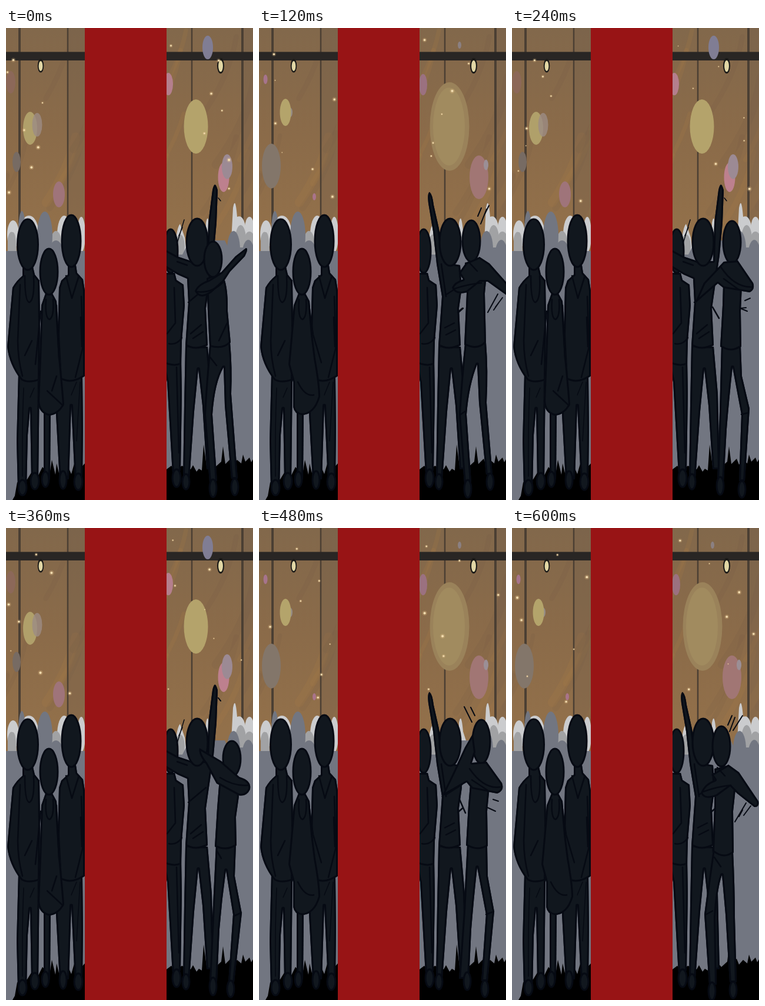
These frames come from a looping animation (420x800 px, 0.72 s). An HTML page with a canvas:

```html
<!DOCTYPE html>
<html lang="en">
<head>
<meta charset="utf-8">
<title>Party crowd</title>
<style>
html, body { margin: 0; width: 100%; height: 100%; overflow: hidden; background: #727681; }
canvas { display: block; }
</style>
</head>
<body>
<canvas id="stage" width="420" height="800"></canvas>
<script>
const ctx = document.getElementById('stage').getContext('2d');
const BODY = '#11171e', INK = '#060a13', GREY = '#727681';

function fill(color, d) {
  ctx.fillStyle = color;
  ctx.fill(new Path2D(d));
}
function line(color, width, d) {
  ctx.strokeStyle = color;
  ctx.lineWidth = width;
  ctx.stroke(new Path2D(d));
}
// body part whose outline lies inside its edge
function part(d) {
  fill(BODY, d);
  ctx.save();
  ctx.clip(new Path2D(d));
  line(INK, 6, d);
  ctx.restore();
}
function oval(color, x, y, rx, ry) {
  ctx.fillStyle = color;
  ctx.beginPath();
  ctx.ellipse(x, y, rx, ry, 0, 0, 7);
  ctx.fill();
}
function blob(x, y, rx, ry) {
  oval(BODY, x, y, rx - 2, ry - 2);
  ctx.strokeStyle = INK;
  ctx.lineWidth = 3;
  ctx.stroke();
}
function random(seed) {
  return () => {
    seed = (seed * 16807) % 2147483647;
    return seed / 2147483647;
  };
}

function wall() {
  const shade = ctx.createLinearGradient(0, 0, 0, 340);
  shade.addColorStop(0, '#82684b');
  shade.addColorStop(.55, '#8b6b49');
  shade.addColorStop(1, '#92704a');
  ctx.fillStyle = shade;
  ctx.fillRect(0, 0, 420, 400);
  const rnd = random(91);
  for (let i = 0; i < 26; i++) {
    const x = rnd() * 480, y = rnd() * 260, len = 60 + rnd() * 90;
    const color = i % 2 ? 'rgba(170,124,66,.17)' : 'rgba(104,84,64,.12)';
    line(color, 6 + rnd() * 10, `M${x} ${y} q-12 ${len / 2} -${len * .45} ${len}`);
  }
  ctx.fillStyle = 'rgba(108,92,76,.28)';
  ctx.fillRect(106, 0, 28, 330);
  ctx.fillRect(403, 0, 17, 330);
  line('#4b3f33', 4, 'M23 0V330M402 0V330');
  line('#4b3f33', 2.5, 'M105 0V330M316 0V330');
  ctx.fillStyle = '#292624';
  ctx.fillRect(0, 40.5, 420, 14.5);
  for (const [x, r] of [[59, 1], [365, 1.15]]) {
    oval('#1b1a18', x, 64, 5.3 * r, 11.5 * r);
    oval('#e2d7a5', x, 64.5, 3.4 * r, 8.5 * r);
  }
}

const LIGHTS = [
  [['#b4a36b', 323, 167, 20.5, 46], ['#b0a06a', 41, 170, 12, 28], ['#9c8c84cc', 53, 164, 8.5, 20],
   ['#8c6859', 8, 92, 8, 19], ['#776b63', 18, 227, 7, 17], ['#9f747a', 90, 282, 10, 22],
   ['#b47f8d', 276, 95, 8, 19], ['#807d94', 343, 33, 9, 20], ['#bd808e', 370, 253, 9.5, 25],
   ['#9c8a94', 376, 235, 9, 21]],
  [['#9a825a', 324, 167, 33.5, 75], ['#a18b5f', 323, 167, 27, 66], ['#a6748c', 11, 87, 3.5, 8],
   ['#948b87', 53, 143, 4, 8], ['#b4a46b', 45, 143, 9.5, 23], ['#83766a', 21, 234, 16, 38],
   ['#a9748a', 94, 286, 3, 6], ['#9b7180', 279, 96, 7, 18], ['#8b8082', 341, 29, 3, 6],
   ['#a17674', 374, 253, 16, 37], ['#9b8f96', 386, 232, 4, 9]]
];

function sparkles(frame) {
  const rnd = random(4073 + frame * 977);
  for (let i = 0; i < 14; i++) {
    const x = i % 2 ? 2 + rnd() * 128 : 276 + rnd() * 140;
    const y = 15 + (i + rnd()) * 20, r = .6 + rnd() * 1.5;
    oval('rgba(240,200,140,.25)', x, y, r * 2, r * 2);
    oval('#f3ddb0', x, y, r, r);
  }
}

function crowd() {
  const pale = '#cbccce', mid = '#a1a2a4';
  oval(pale, 12, 350, 10, 24);
  oval(pale, 39, 345, 16, 27);
  oval(pale, 99, 350, 12, 32);
  oval(pale, 128, 350, 7, 30);
  fill(mid, 'M3 378V356Q6 343 11 346Q17 344 18 378Z');
  oval(mid, 85, 364, 9, 20);
  oval(GREY, 27, 345, 6, 35);
  oval(GREY, 66, 352, 13, 41);
  oval(GREY, 85, 385, 13, 25);
  fill(pale, 'M286 400Q288 340 296 332L304 355L310 400ZM340 400V330Q344 310 347 345L352 360V400Z');
  fill(pale, 'M382 380L386 305Q390 283 393 320Q404 315 408 340L412 380Z');
  oval(pale, 414, 340, 8, 20);
  oval(mid, 296, 370, 8, 20);
  oval(mid, 399, 358, 9, 24);
  oval(mid, 414, 360, 9, 15);
  oval(GREY, 387, 375, 11, 31);
  oval(GREY, 412, 388, 11, 29);
  fill(GREY, 'M0 378H20L24 350H52L58 378H134V800H0ZM273 384H300L312 360H372L378 372H420V800H273Z');
  fill('#000', 'M11 800L15 793L19 770L36 765L44 752L53 762L62 744L74 757L78 732L84 757L86 738L90 754L105 742L111 756L117 735L123 750L134 738V800Z');
  fill('#000', 'M273 748L281 742L288 750L299 742L314 748L318 741L324 752L328 747L333 750L336 706L341 742L349 736L356 744L366 735L369 709L373 739L382 730L386 740L393 732L400 738L403 723L407 735L414 728L417 736L420 731V800H273Z');
}

function trio(alt) {
  // tall left figure
  part('M21 585L57 590L56 680L55 768H43L41 645L37 690L35 780H20L18 700Z');
  blob(28, 779, 9, 15);
  blob(49, 768, 9, 16);
  part('M28 405L46 405L49 418L57 428L58 500L57 597Q38 604 26 597Q5 570 2 540L11 440Q18 428 28 420Z');
  line(INK, 2.5, 'M24 435L20 530Q20 560 28 590M32 420Q32 465 40 465Q49 460 47 420M44 530L32 555');
  line(INK, 1.5, 'M48 610L41 626M30 610Q27 680 28 760');
  blob(37, 367, 19.5, 45);
  // right figure of the trio
  part('M87 590H130L131 680L130 765H117L111 640L107 765H91L85 655Z');
  blob(97, 766, 8, 17);
  blob(123, 769, 9, 16);
  part('M105 402L119 402L121 415L131 426L134 445V590Q112 606 92 595L88 520L90 440L94 428L105 418Z');
  line(INK, 2.5, 'M102 420L112 458L124 420M128 455L131 540L118 592M127 490L129 540');
  line(INK, 1.5, 'M120 600L111 622M126 600L120 700');
  blob(111, 361, 18, 46);
  // short figure in the middle
  part('M64 645H76L75 765L64 770Z');
  blob(67, 765, 8, 15);
  part(alt
    ? 'M67 450L79 450L86 463L91 520L96 560Q104 605 104 625Q95 656 72 656Q60 654 58 642L58 600L50 570L59 470Z'
    : 'M67 450L79 450L86 463L92 560Q97 610 99 638Q90 656 72 657Q55 652 54 632L57 560L60 470Z');
  line(INK, 2.5, alt
    ? 'M68 460Q66 492 74 494Q82 490 80 460M85 470L92 520L106 567M66 600Q78 625 93 622'
    : 'M68 460Q66 492 74 494Q82 490 80 460M86 470L90 560M59 480L50 570M70 615L97 640M86 590L78 615');
  blob(73, 413, 17, 41);
}

function pair(alt) {
  // figure half hidden by the band
  part('M265 560H298L299 620L297 750L283 755L274 600Z');
  blob(290, 763, 9, 17);
  part('M265 415H287L290 427L302 435L304 470L299 530L298 570Q285 576 265 567Z');
  line(INK, 2.5, 'M286 440L288 500L274 518M277 535Q290 538 299 525M290 575L294 720');
  blob(280, 378, 14, 39);
  // middle dancer
  part('M305 538L343 540L350 620L353 748H341L334 640L327 578L320 650L312 764H301L303 640Z');
  blob(306, 769, 8, 15);
  if (alt) {
    part('M288 297Q286 280 290 278Q295 282 297 300L306 340L312 382L320 398L342 402L345 440L340 475L343 538Q322 549 305 538L311 455L302 400L296 345Z');
    line(INK, 2.5, 'M310 400L318 455M318 452L345 435M332 500L316 508M334 512L318 520M346 475L338 482');
  } else {
    part('M342 395L344 330L351 275Q355 256 360 275L358 330L353 385L345 440L340 475L343 538Q322 549 305 538L310 465L308 425L292 418L270 405V375L294 388L318 396Z');
    line(INK, 2.5, 'M291 396L308 402M310 465L340 440M332 503L314 518M335 515L318 526');
    line(INK, 1.5, 'M303 325L290 368M300 338L294 352M361 288L365 293');
  }
  blob(325, 363, 20, 42);
}

// Each pose: head, feet, legs, torso, arms, folds, motion marks.
const POSES = [
  { head: [352, 392, 17, 32], feet: [352, 780, 389, 778],
    legs: 'M346 538L381 533Q385 575 383 620L394 764H383L372 640L370 575Q355 600 351 655L359 768L346 770L337 655Q340 600 346 538Z',
    torso: 'M341 424L366 414Q378 432 377 480L382 533Q370 547 346 540L343 480Z',
    arms: 'M366 414L390 387L408 373Q413 373 406 387L381 413L370 430L350 448Q330 463 321 446Q325 434 345 427Z',
    folds: 'M325 447Q350 450 370 430M376 500L362 530M347 558L358 572' },
  { head: [361, 361, 17, 37], feet: [355, 781, 393, 769],
    legs: 'M350 535L386 533Q390 580 387 635L397 757H386L374 635L371 570Q357 605 353 655L361 770L349 772L340 655Q343 600 350 535Z',
    torso: 'M350 398L375 390L388 408L384 450L386 533Q372 549 349 537L353 450Z',
    arms: 'M375 388L392 399L424 435V455L389 430L376 430L354 448Q333 454 328 440Q332 430 347 426L340 415L352 398Z',
    folds: 'M332 442Q356 434 378 432M357 397L371 412M347 475L339 482M343 655L350 650',
    marks: 'M378 305L372 319M387 307L377 332M391 301L384 315M406 451L389 482M414 457L402 473M408 465L399 478' },
  { head: [374, 363, 17, 38], feet: [354, 776, 391, 782],
    legs: 'M356 536L389 538L391 590L404 645L396 768H386L390 655L375 575Q369 630 365 680L360 770H349L353 650Z',
    torso: 'M360 400L384 394L392 415L389 480L390 540Q373 553 354 540L358 470Z',
    arms: 'M384 394L410 432Q414 443 404 448L360 441L350 433L310 468L326 432L360 396Z',
    folds: 'M355 405Q378 440 408 439M360 425L385 443M341 473L352 492M390 655L402 652',
    marks: 'M396 462L405 458M388 475L400 480M388 475L398 474' },
  { head: [384, 391, 17, 32], feet: [352, 777, 382, 781],
    legs: 'M357 537L391 538L389 590L401 653L388 770H378L386 655L374 580Q367 630 363 680L359 769H346L351 660Z',
    torso: 'M363 425L392 425L396 455L391 490L392 538Q375 550 355 540L359 475Z',
    arms: 'M329 373L366 395L397 422Q418 428 415 443Q409 456 395 453L358 433L340 400Q326 383 329 373Z',
    folds: 'M364 423Q388 438 411 436M387 658L400 652M359 548L366 560',
    marks: 'M361 288L365 293' },
  { head: [378, 362, 17, 39], feet: [354, 768, 384, 781],
    legs: 'M354 536L388 538L389 590L400 650L389 768H378L386 655L371 575Q365 630 361 680L357 764H340L348 650Z',
    torso: 'M362 400L387 396L394 418L388 480L389 539Q372 550 352 538L356 470Z',
    arms: 'M387 396L413 432Q418 445 405 450L362 442L353 431L310 456L330 415L350 372L364 348L368 380L362 398Z',
    folds: 'M358 408Q382 443 410 439M362 427L388 444M341 460L351 483M386 655L399 650',
    marks: 'M349 303L362 329M360 304L367 318M398 460L407 463M389 474L402 480' },
  { head: [356, 370, 17, 36], feet: [340, 785, 376, 783],
    legs: 'M342 545L376 548Q379 610 379 660L382 770H370L363 655L357 588Q349 610 346 660L348 774H335L327 655Q334 600 342 545Z',
    torso: 'M344 408L368 402L382 425L376 480L377 550Q360 564 341 548L344 470Z',
    arms: 'M368 401L386 414L419 463Q421 474 412 473L383 450L371 438L349 454Q326 463 321 449Q327 433 345 427L339 418Z',
    folds: 'M325 447Q350 438 372 436M349 406L362 420M330 655L341 649M344 558L355 574',
    marks: 'M374 318L367 334M379 321L370 345M392 318L376 343M398 466L379 498M406 471L394 487M392 478L386 489' }
];

function dancer({ head, feet, legs, torso, arms, folds, marks = '' }) {
  part(legs);
  blob(feet[0], feet[1], 8, 17);
  blob(feet[2], feet[3], 8, 16);
  part(torso);
  blob(...head);
  part(arms);
  line(INK, 2.5, folds);
  line(INK, 2, marks);
}

function draw(frame) {
  const alt = [0, 1, 0, 0, 1, 1][frame];
  wall();
  for (const light of LIGHTS[alt]) oval(...light);
  sparkles(frame);
  crowd();
  trio(alt);
  pair(alt);
  dancer(POSES[frame]);
  ctx.fillStyle = '#981415';
  ctx.fillRect(134, 0, 139, 800);
}

ctx.lineJoin = ctx.lineCap = 'round';
function tick() {
  draw(Math.floor(performance.now() % 720 / 120));
  requestAnimationFrame(tick);
}
tick();
</script>
</body>
</html>
```
